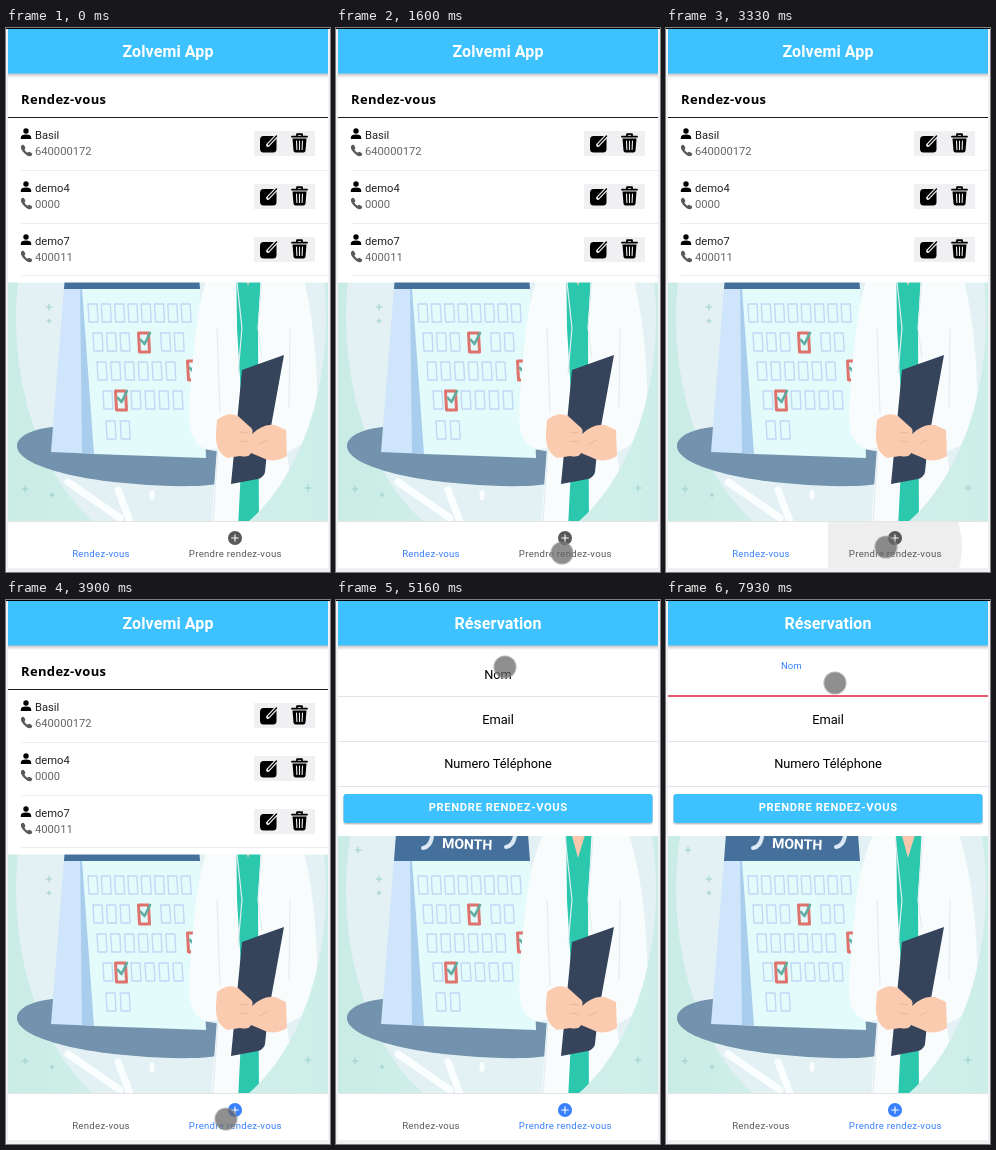
An HTML page that plays this animation: 324x544 px, repeating every 8 s.

```html
<!DOCTYPE html>
<html lang="fr">
<head>
<meta charset="utf-8">
<title>Rendez-vous</title>
<style>
html, body { margin: 0; width: 100%; height: 100%; overflow: hidden; background: #f1f1f4; }
svg { display: block; width: 324px; height: 544px; font-family: Roboto, "Open Sans", sans-serif; }
.title { font-size: 16px; font-weight: 700; letter-spacing: .1px; fill: #fff; text-anchor: middle; }
.heading { font: 700 13px "Open Sans", "Noto Sans", sans-serif; letter-spacing: .35px; }
.item { font-size: 11.2px; }
.field { font-size: 12.8px; text-anchor: middle; }
.tab { font-size: 9.6px; letter-spacing: .288px; text-anchor: middle; }
.button { font-size: 11.2px; font-weight: 600; letter-spacing: .62px; fill: #fff; text-anchor: middle; }
</style>
</head>
<body>
<svg id="stage" viewBox="0 0 324 544"></svg>
<script>
const LOOP = 8000, BLUE = '#3dc2ff', ACTIVE = '#3880ff', GREY = '#595959';
const stage = document.getElementById('stage');

const rect = (x, y, w, h, fill, extra = '') =>
  `<rect x="${x}" y="${y}" width="${w}" height="${h}" fill="${fill}" ${extra}/>`;
const path = (d, fill, extra = '') => `<path d="${d}" fill="${fill}" ${extra}/>`;
const line = (d, color, width, extra = '') =>
  path(d, 'none', `stroke="${color}" stroke-width="${width}" stroke-linecap="round" stroke-linejoin="round" ${extra}`);
const text = (x, y, cls, str, fill = '') =>
  `<text x="${x}" y="${y}" class="${cls}" ${fill && `fill="${fill}"`}>${str}</text>`;
const sparkle = (x, y, r = 3) => line(`M${x - r} ${y}h${2 * r}M${x} ${y - r}v${2 * r}`, '#9ccfca', 1);

const cell = (x, y) => line(`M${x - 5} ${y - 9}h9l1 18h-9z`, '#c0d9f5', 1.4);
const checkedCell = (x, y) =>
  line(`M${x - 5.5} ${y - 9}h10l1 19h-10z`, '#dd736c', 3) +
  line(`M${x - 3} ${y - 2}l3.5 4l5.5 -11`, '#5fada2', 2.6);

function calendar() {
  const rows = [[87, 285, 8], [92, 314, 7], [96, 343, 6], [102, 372, 6], [105, 402, 2]];
  const checked = [[138, 314], [187, 342], [115, 372]];
  const near = (x, y) => checked.some(c => Math.abs(c[0] - x) < 9 && Math.abs(c[1] - y) < 3);
  let cells = '';
  for (const [x, y, count] of rows)
    for (let i = 0; i < count; i++) {
      const cx = x + i * (13.3 + (y - 285) * .008);
      if (!near(cx, y)) cells += cell(cx, y);
    }
  return path('M58 260L45 424L92 426L78 260Z', '#cfe5fb') +
    path('M74 260L76 425L92 426L80 260Z', '#a9cdec') +
    path('M76 260H194L200 430L88 426Z', '#e4fbfb') +
    path('M61 220H191L194 261L58 261Z', '#44709b') +
    line('M87 248Q94 247 96 237M170 247Q177 246 179 236', '#dbe9f5', 4) +
    `<text x="131" y="249" font-size="14" font-weight="700" fill="#fff" text-anchor="middle" transform="rotate(2 131 249)">MONTH</text>` +
    cells + checked.map(c => checkedCell(...c)).join('');
}

function doctor() {
  return path('M213 225C199 246 192 280 189 312C185 350 181 390 185 405Q193 425 211 420L205 500H290L281 424C300 416 311 405 312 392C311 340 309 280 290 225Z', '#f8fcfd') +
    path('M230 225H256L252 300L253 500H232L237 400L231 300Z', '#2bc8ae') +
    path('M233 225H252L242 258Z', '#f9c8ac') +
    line('M229 236L236 300L232 345M257 236L252 300L256 330M211 300L214 385M284 300L283 380M212 420L207 494', '#e3edf1', 1.2) +
    path('M236 342L278 327L262 415L259 444Q258 449 252 451L225 456Z', '#35445a') +
    path('M211 392Q222 383 232 388L243 398Q248 401 246 406Q258 395 269 397L280 402L281 428Q267 436 257 430L245 425Q243 430 234 428L221 430Q209 424 210 405Z', '#fbcbb0') +
    line('M234 404l8 1M234 413l8 1M253 416l8 -4', '#efb59b', 1);
}

// The scene sits in a pale oval; only the base plate reaches past it.
function art() {
  return rect(2, 180, 320, 316, 'url(#mint)') +
    '<ellipse cx="165" cy="290" rx="155" ry="235" fill="#e4f1f4"/>' +
    path('M11 418C11 407 30 399 60 398L215 424C236 432 244 444 228 452C206 460 166 459 130 456C70 452 11 437 11 418Z', '#7292ad') +
    `<g clip-path="url(#oval)">${line('M62 454L114 490M112 462L125 496', '#fbfefe', 7)}
    <ellipse cx="146" cy="467" rx="2.5" ry="5" fill="#fbfefe"/>${calendar()}${doctor()}</g>` +
    sparkle(22, 250) + sparkle(43, 279) + sparkle(43, 293, 2) +
    sparkle(19, 461) + sparkle(46, 467, 2) + sparkle(302, 460);
}

function header(title) {
  return rect(2, 45, 320, 5, 'url(#shade)') + rect(2, 1, 320, 44.5, BLUE) + text(162, 29, 'title', title);
}

const person = y => `<circle cx="20" cy="${y - 3}" r="2.7"/>` +
  path(`M14.8 ${y + 5}v-1.2q0 -3.3 5.2 -3.3t5.2 3.3v1.2z`, '#000');
const phone = y => path(`M16 ${y - 5}q1.5 -1 2.5 1l.8 1.6q.4 1 -.9 2q1 2.2 3.2 3.2q1 -1.3 2 -.9l1.6 .9q1.8 1 .7 2.4q-2 2.2 -5.5 -.3q-3.4 -2.4 -5.2 -6q-1 -2.8 .8 -3.9z`, GREY);
const edit = y => rect(254, y - 7, 16.5, 16.5, '#000', 'rx="3.5"') +
  line(`M262 ${y + 2}L271 ${y - 7.5}`, '#f0f0f3', 3.8) + line(`M262.5 ${y + 1.5}L270.5 ${y - 7}`, '#000', 1.4);
const trash = y => path(`M286.5 ${y - 4.5}h14l-1 12q-.2 2 -2 2h-8q-1.8 0 -2 -2z`, '#000') +
  line(`M286 ${y - 6.3}h15M291 ${y - 7.5}v-1.3h5v1.3`, '#000', 1.8) +
  line(`M290.5 ${y - 2}l.4 8.5M293.5 ${y - 2}v8.5M296.5 ${y - 2}l-.4 8.5`, '#f0f0f3', 1.1);

function listRow([name, number], i) {
  const y = 53 * i;
  return person(106 + y) + text(29, 111 + y, 'item', name, '#222') +
    phone(122 + y) + text(29, 127 + y, 'item', number, '#666') +
    rect(248, 103 + y, 61, 25, '#f0f0f3') + edit(115 + y) + trash(115 + y) +
    rect(15, 142 + y - (i > 1), 307, 1, '#ececec');
}

function listPage() {
  const people = [['Basil', '640000172'], ['demo4', '0000'], ['demo7', '400011']];
  return rect(2, 1, 320, 493, '#fff') + '<use href="#art"/>' + rect(2, 1, 320, 253.5, '#fff') +
    header('Zolvemi App') + text(15, 76, 'heading', 'Rendez-vous') +
    rect(2, 89, 320, 1, '#1a1a1a') + people.map(listRow).join('');
}

function formPage() {
  return rect(2, 1, 320, 493, '#fff') + '<use href="#art"/>' +
    rect(2, 1, 320, 235, '#fff') + header('Réservation') +
    [96, 141, 186].map(y => rect(2, y, 320, 1, '#e2e5ec')).join('') +
    rect(2, 95, 320, 2, '#eb5a6c', 'id="underline"') +
    `<g id="label">${text(147, 0, 'field', 'Nom')}</g>` +
    text(162, 124, 'field', 'Email') + text(162, 168, 'field', 'Numero Téléphone') +
    rect(7, 195, 310, 30, '#000', 'rx="3" opacity=".1"') + rect(7.5, 195, 309, 29, '#000', 'rx="3" opacity=".15"') +
    rect(7.5, 194, 309, 29, BLUE, 'rx="2.5"') + text(162.3, 211, 'button', 'PRENDRE RENDEZ-VOUS') +
    rect(161.5, 74, 1, 16, '#222', 'id="caret"');
}

stage.innerHTML = `<defs>
  <linearGradient id="mint"><stop stop-color="#c9ece5"/><stop offset=".5" stop-color="#d6f0ec"/><stop offset="1" stop-color="#cdeee8"/></linearGradient>
  <linearGradient id="shade" x2="0" y2="1"><stop stop-color="#000" stop-opacity=".25"/><stop offset="1" stop-color="#000" stop-opacity="0"/></linearGradient>
  <clipPath id="view"><rect x="2" y="1" width="320" height="493"/></clipPath>
  <clipPath id="oval"><ellipse cx="165" cy="290" rx="155" ry="235"/></clipPath>
  <clipPath id="tabArea"><rect x="162" y="494" width="160" height="46"/></clipPath>
  <g id="art">${art()}</g></defs>
  ${rect(0, 0, 324, 544, '#f0f0f3')}
  <g clip-path="url(#view)">${listPage()}<g id="form">${formPage()}</g></g>
  ${rect(0, 0, 324, 1, '#000')}${rect(2, 493, 320, 47, '#fff')}${rect(2, 493, 320, 1, '#e4e4e4')}
  <g clip-path="url(#tabArea)"><circle id="ripple" cx="220" cy="519"/></g>
  <g id="listTab">${text(95, 529, 'tab', 'Rendez-vous')}</g>
  <g id="formTab"><circle cx="229" cy="510" r="7"/>${line('M225.7 510h6.6M229 506.7v6.6', '#fff', 1.1)}${text(229.3, 529, 'tab', 'Prendre rendez-vous')}</g>
  <circle id="pointer" r="10.5" fill="#646464" fill-opacity=".72" stroke="#888" stroke-opacity=".6" stroke-width="2.2"/>`;

const part = {};
stage.querySelectorAll('[id]').forEach(el => part[el.id] = el);
const set = (name, attrs) => {
  for (const key in attrs) part[name].setAttribute(key, attrs[key]);
};

const clamp = p => Math.max(0, Math.min(1, p));
const span = (t, from, to) => clamp((t - from) / (to - from));
const easeOut = p => 1 - (1 - p) ** 3;
const smooth = p => p * p * (3 - 2 * p);

// Pointer stops: time, x, y
const stops = [
  [230, 338, 300], [600, 290, 430], [1030, 222, 531], [1160, 226, 525], [1600, 226, 525], [1700, 222, 511],
  [1900, 222, 511], [2150, 276, 493], [2400, 222, 531], [2600, 220, 521], [2800, 220, 521], [2830, 220, 519],
  [3900, 220, 519], [4160, 201, 405], [4300, 201, 405], [4700, 176, 210], [4950, 151, 92], [5100, 163, 75],
  [5160, 169, 67], [5830, 169, 67], [6000, 169, 83]
];
function pointerAt(t) {
  const i = stops.findIndex(s => s[0] > t);
  if (i === 0) return stops[0].slice(1);
  if (i < 0) return stops[stops.length - 1].slice(1);
  const a = stops[i - 1], b = stops[i], p = smooth(span(t, a[0], b[0]));
  return [a[1] + (b[1] - a[1]) * p, a[2] + (b[2] - a[2]) * p];
}

function draw(t) {
  const [x, y] = pointerAt(t);
  set('pointer', { cx: x, cy: y });

  const chosen = t >= 3560;
  set('listTab', { fill: chosen ? GREY : ACTIVE });
  set('formTab', { fill: chosen ? ACTIVE : GREY });
  set('ripple', {
    r: 20 + 56 * easeOut(span(t, 3110, 3330)),
    fill: chosen ? ACTIVE : GREY,
    opacity: .1 * span(t, 3110, 3190) * (1 - span(t, 3560, 3760))
  });

  const enter = easeOut(span(t, 3910, 4170));
  set('form', { opacity: enter, transform: `translate(0 ${40 * (1 - enter)})` });

  const focus = smooth(span(t, 5450, 5640));
  set('label', {
    transform: `translate(15 ${79 - 10 * focus}) scale(${1 - .25 * focus})`,
    fill: t >= 5460 ? ACTIVE : '#000'
  });
  set('underline', { opacity: focus });
  set('caret', { opacity: t >= 5460 && Math.floor((t - 5460) / 494) % 2 === 0 ? 1 : 0 });
}

function tick() {
  draw(performance.now() % LOOP);
  requestAnimationFrame(tick);
}
tick();
</script>
</body>
</html>
```
